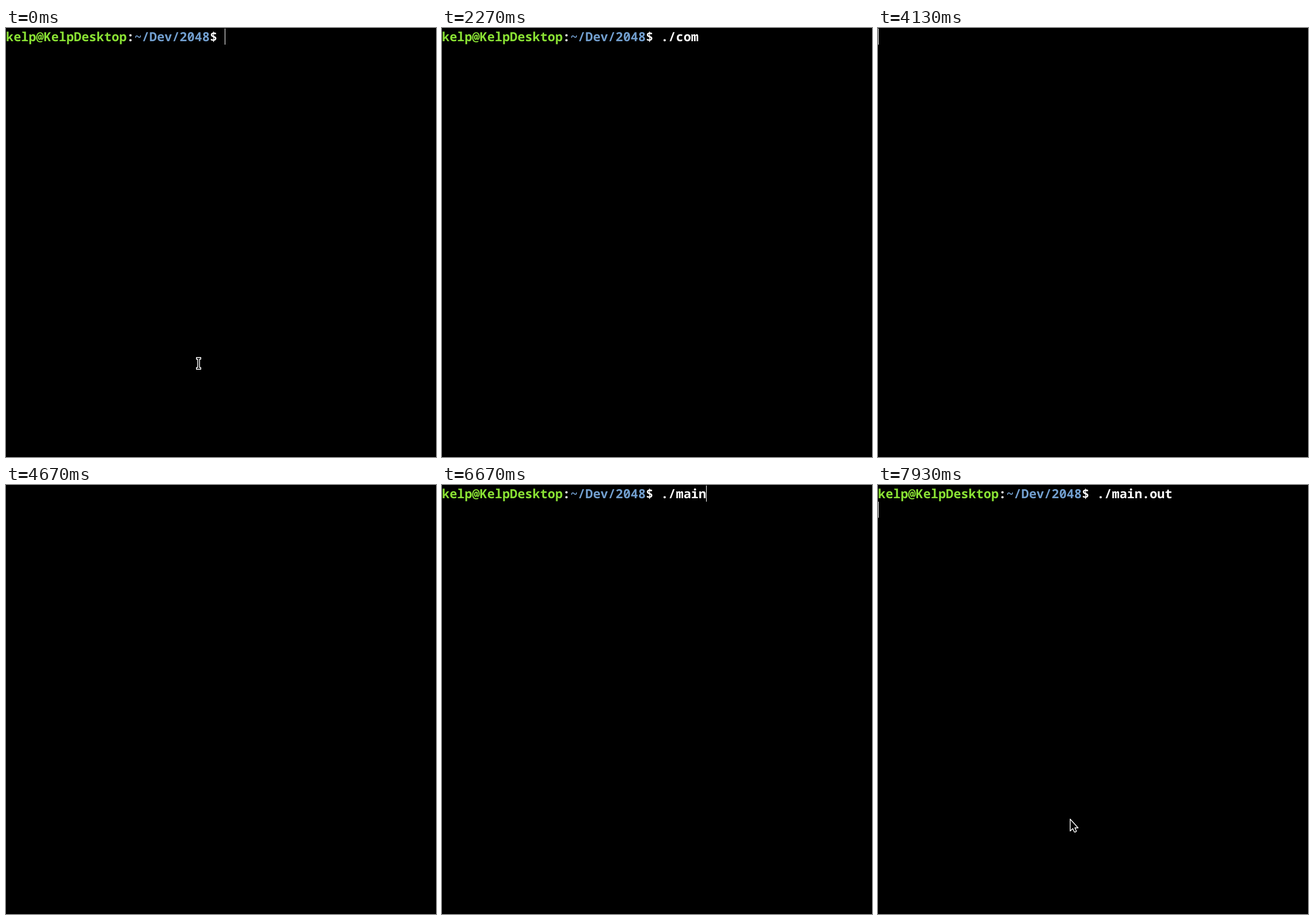
These frames come from a looping animation (749 by 747 pixels, 8000 ms). An HTML page:

```html
<!DOCTYPE html>
<html lang="en">
<head>
<meta charset="utf-8">
<title>Terminal session</title>
<style>
  html, body { margin: 0; width: 100%; height: 100%; overflow: hidden; background: #000; }
  svg { display: block; width: 749px; height: 747px; }
  text {
    font: 700 21.917px "Noto Sans Mono", "DejaVu Sans Mono", monospace;
    white-space: pre;
    text-rendering: geometricPrecision;
    font-variant-ligatures: none;
    fill: #fff;
  }
  .user { fill: #8ae234; }
  .path { fill: #729fcf; }
  .pointer { fill: #000; stroke: #fff; stroke-width: 1.4; stroke-linejoin: round; }
</style>
</head>
<body>
<svg viewBox="0 0 749 747">
  <text id="line" x="0" y="23"><tspan class="user">kelp@KelpDesktop</tspan>:<tspan class="path">~/Dev/2048</tspan>$ <tspan id="command"></tspan></text>
  <rect id="caret" width="1" height="28" fill="#fff" shape-rendering="crispEdges"/>
  <path id="beam" class="pointer" d="M331.7 573.7h7.6v3h-2.2v14.6h2.2v3h-7.6v-3h2.2v-14.6h-2.2z"/>
  <path id="arrow" class="pointer" d="M334.7 581.7V602.5L339.3 598.3L342 604.2Q343.8 605 345.6 602.8L342.9 597H348.6z"/>
</svg>
<script>
const LOOP = 8000;
const CELL = 13.15;
const LINE = 28;
const PROMPT_CELLS = 29;
const CLEARED = null;

// [time, command, caret visible, caret row]
const steps = [
  [0, "", 1], [130, "", 0], [530, "", 1], [870, "", 0],
  [1000, ".", 1], [1130, "./", 1], [1470, "./", 0],
  [1530, "./c", 1], [1730, "./co", 1], [1930, "./com", 1], [2270, "./com", 0],
  [2330, "./comp", 1], [2530, "./compi", 0], [2600, "./compi", 1],
  [2870, "./compil", 1], [3000, "./compile", 1], [3400, "./compile", 0],
  [3470, "./compile.", 1], [3800, "./compile.s", 1], [3930, "./compile.sh", 1],
  [4130, CLEARED, 1], [4470, CLEARED, 0], [4800, CLEARED, 1],
  [4870, "", 1], [5270, "", 0], [5530, ".", 1], [5670, "./", 1], [6000, "./", 0],
  [6070, "./m", 1], [6200, "./ma", 1], [6330, "./mai", 1], [6670, "./main", 1],
  [6930, "./main.", 1], [7200, "./main.o", 1], [7330, "./main.ou", 1],
  [7470, "./main.out", 1], [7730, "./main.out", 0],
  [7800, "./main.out", 1, 1]
];
const BEAM_HIDES = 1000;
const ARROW_SHOWS = 7930;

const [line, command, caret, beam, arrow] =
  ["line", "command", "caret", "beam", "arrow"].map(id => document.getElementById(id));

function show(element, visible) {
  element.style.visibility = visible ? "visible" : "hidden";
}

function render(time) {
  const [, typed, caretOn, row = 0] = steps.findLast(([start]) => start <= time);
  const cleared = typed === CLEARED;
  const column = cleared || row ? 0 : PROMPT_CELLS + typed.length;

  show(line, !cleared);
  command.textContent = typed || "";
  caret.setAttribute("x", Math.floor(column * CELL));
  caret.setAttribute("y", 1 + row * LINE);
  show(caret, caretOn);
  show(beam, time < BEAM_HIDES);
  show(arrow, time >= ARROW_SHOWS);
}

const begin = performance.now();
function tick() {
  render((performance.now() - begin) % LOOP);
  requestAnimationFrame(tick);
}
tick();
</script>
</body>
</html>
```
